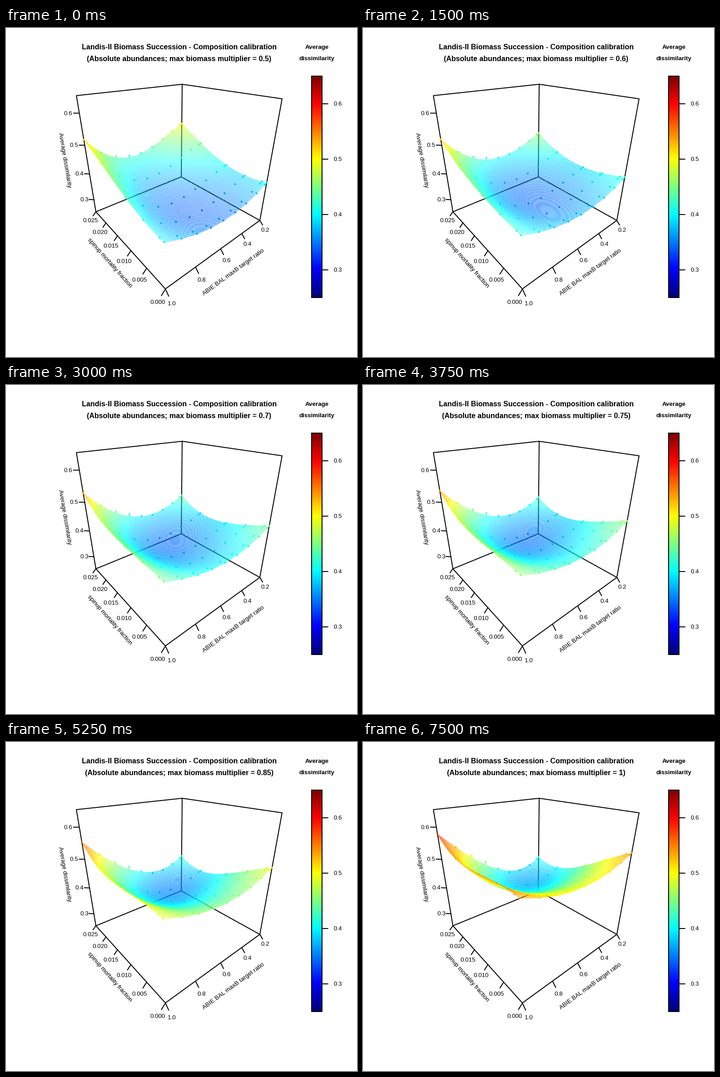
A matplotlib script that plays this animation: 773 by 725 pixels, repeating every 8250 ms.

```python
import numpy as np
import matplotlib.pyplot as plt
from matplotlib.animation import FuncAnimation
from matplotlib.collections import LineCollection
from matplotlib.colors import LinearSegmentedColormap, Normalize

W, H, DPI = 773, 725, 100
PX = 72 / DPI                      # one pixel in points
FRAMES, STEP_MS = 11, 750
Z_MIN, Z_MAX = 0.25, 0.65

plt.rcParams["font.family"] = "Liberation Sans"
jet = LinearSegmentedColormap.from_list(
    "jet9", ["#00007F", "#0000FF", "#007FFF", "#00FFFF", "#7FFF7F",
             "#FFFF00", "#FF7F00", "#FF0000", "#7F0000"], N=100)

# Box corners in pixels, keyed by unit-cube position
# (u: ratio 1 -> 0.2, v: mortality 0 -> 0.025, w: height)
CORNERS = {(0, 0, 0): (351, 575), (0, 1, 0): (198, 405), (1, 0, 0): (559, 424),
           (1, 1, 0): (386, 328), (0, 1, 1): (155, 149), (1, 1, 1): (388, 124),
           (1, 0, 1): (608, 156)}


def solve_camera():
    rows, rhs = [], []
    for p, (x, y) in CORNERS.items():
        p, none = np.array(p), np.zeros(4)
        hom = np.append(p, 1)
        rows += [np.concatenate([hom, none, -x * p]),
                 np.concatenate([none, hom, -y * p])]
        rhs += [x, y]
    coef = np.linalg.lstsq(np.array(rows), np.array(rhs), rcond=None)[0]
    return np.append(coef, 1).reshape(3, 4)


CAMERA = solve_camera()


def project(u, v, w):
    u, v, w = np.broadcast_arrays(u, v, w)
    x, y, depth = np.tensordot(CAMERA, np.stack([u, v, w, np.ones(w.shape)]), 1)
    return np.stack([x / depth, y / depth], -1), depth


def surface(u, v, t):
    """Valley along v: a cubic in x whose tilt grows as t goes 0 -> 1."""
    x = 2 * u - 1
    ease = 1.5 * t - 0.5 * t**2
    floor = (0.252 + 0.17 * t + 0.42 * t**2 - 0.224 * t**3
             - (0.27 + 0.185 * t) * v
             + (0.70 - 2.25 * t + 1.22 * t**2) * v**2
             - (0.26 - 1.93 * t + 1.10 * t**2) * v**3)
    bend = 0.112 - 0.01 * t + 0.11 * v + (0.05 + 0.1 * ease) * v * (1 - v)
    tilt = 0.22 * v - 0.14 * v**2 - ease * (0.30 * v + 0.04 * v**2)
    skew = -0.26 * v + 0.19 * v**2 - 0.47 * tilt
    return floor + tilt * x + bend * x**2 + skew * x**3


def bump(u, centre, spread):
    return np.exp(-((u - centre) / spread)**2)


def residual(u, v, t):
    """Gap between observation and fit, mostly at the highest mortality."""
    return v**6 * ((0.018 + 0.012 * t) * bump(u, 0.34, 0.13)
                   - 0.022 * t * bump(u, 0.67, 0.09))


GRID = np.linspace(0, 1, 100)
DOT_U = np.append(np.arange(8) / 8, [0.975, 1])
DOT_V = np.array([0, 0.001, 0.005, 0.010, 0.018, 0.025]) / 0.025


def pairs(a, axis):
    a = np.moveaxis(a, axis, 0)
    head, tail = a[:-1], a[1:]
    return head.reshape((-1,) + a.shape[2:]), tail.reshape((-1,) + a.shape[2:])


def scene(t):
    """Segments, heights and widths of mesh, stems and dots, far to near."""
    segs, level, depth, width = [], [], [], []

    def add(p, q, w, d, px):
        segs.append(np.stack([p, q], 1))
        level.append(w)
        depth.append(d)
        width.append(np.full(len(w), px * PX))

    u, v = np.meshgrid(GRID, GRID)
    w = surface(u, v, t)
    xy, dist = project(u, v, w)
    for axis in (0, 1):
        p, q = pairs(xy, axis)
        add(p, q, np.mean(pairs(w, axis), 0), np.mean(pairs(dist, axis), 0), 0.55)

    u, v = (a.ravel() for a in np.meshgrid(DOT_U, DOT_V))
    fit, gap = surface(u, v, t), residual(u, v, t)
    obs = fit + gap
    foot, _ = project(u, v, fit)
    top, dist = project(u, v, obs)
    near = dist - 0.03
    off = np.abs(gap) > 0.004
    add(foot[off], top[off], obs[off], near[off], 1.6)
    add(top - 0.05, top + 0.05, obs, near, 4.2)

    order = np.argsort(-np.concatenate(depth), kind="stable")
    return (np.concatenate(segs)[order], np.concatenate(level)[order],
            np.concatenate(width)[order])


fig = plt.figure(figsize=(W / DPI, H / DPI), dpi=DPI, facecolor="white")
ax = fig.add_axes([0, 0, 1, 1])
ax.axis("off")


def line(points, zorder=1):
    x, y = zip(*points)
    ax.plot(x, y, color="black", lw=2 * PX, zorder=zorder,
            solid_capstyle="round", solid_joinstyle="round")


def label(x, y, text, size=13.33, **kw):
    kw = {"ha": "center", "va": "baseline", **kw}
    return ax.text(x, y, text, fontsize=size * PX, **kw)


def slanted(x, y, text, angle):
    label(x, y, text, rotation=angle, va="center", rotation_mode="anchor")


def tick(start, step, text):
    reach = np.array([0, 0.031, 0.06])[:, None]
    begin, end, spot = project(*(np.array(start) + reach * np.array(step)).T)[0]
    line([begin, end])
    label(spot[0], spot[1] + 4.7, text)


def draw_box():
    for path in ([(0, 0, 0), (0, 1, 0), (0, 1, 1), (1, 1, 1), (1, 0, 1),
                  (1, 0, 0), (0, 0, 0)],
                 [(0, 1, 0), (1, 1, 0), (1, 0, 0)],
                 [(1, 1, 0), (1, 1, 1)]):
        line([CORNERS[p] for p in path])


def draw_axes():
    for i in range(6):
        tick((0, i / 5, 0), (-1, 0, -1), f"{i * 0.005:.3f}")
    for i in range(5):
        tick((i / 4, 0, 0), (0, -1, -1), f"{1 - i * 0.2:.1f}")
    for i in range(4):
        tick((0, 1, 0.125 + i / 4), (-1, 1, 0), f"{0.3 + i * 0.1:.1f}")
    slanted(228, 517.5, "spinup mortality fraction", -48.5)
    slanted(501.5, 538, "ABIE.BAL maxB target ratio", 36.3)
    slanted(129.5, 291, "Average dissimilarity", -80.5)


def draw_colorbar():
    x0, x1, top, base = 672.5, 696, 105.5, 593.5
    ax.imshow(np.linspace(1, 0, 100)[:, None], cmap=jet, aspect="auto",
              interpolation="nearest", extent=(x0, x1, base, top), zorder=1)
    line([(x0, top), (x1, top), (x1, base), (x0, base), (x0, top)], 3)
    for z in (0.3, 0.4, 0.5, 0.6):
        y = base + (top - base) * (z - Z_MIN) / (Z_MAX - Z_MIN)
        line([(x1, y), (708.5, y)], 3)
        label(731, y + 4.7, f"{z:.1f}")
    label(684.5, 45.5, "Average", weight="bold")
    label(684.5, 71, "dissimilarity", weight="bold")


draw_box()
draw_axes()
draw_colorbar()
label(382, 46.5, "Landis-II Biomass Succession - Composition calibration",
      16, weight="bold")
subtitle = label(381.5, 72.5, "", 16, weight="bold")
mesh = LineCollection([], cmap=jet, norm=Normalize(Z_MIN, Z_MAX),
                      capstyle="round", zorder=2, snap=False)
ax.add_collection(mesh, autolim=False)
ax.set_xlim(0, W)
ax.set_ylim(H, 0)


def update(i):
    t = i / (FRAMES - 1)
    segs, level, width = scene(t)
    mesh.set_segments(segs)
    mesh.set_linewidths(width)
    mesh.set_array(Z_MIN + (Z_MAX - Z_MIN) * level)
    subtitle.set_text(
        f"(Absolute abundances; max biomass multiplier = {0.5 + t / 2:.3g})")
    return mesh, subtitle


anim = FuncAnimation(fig, update, frames=FRAMES, interval=STEP_MS,
                     repeat=True, repeat_delay=0, blit=False)
plt.show()
```
